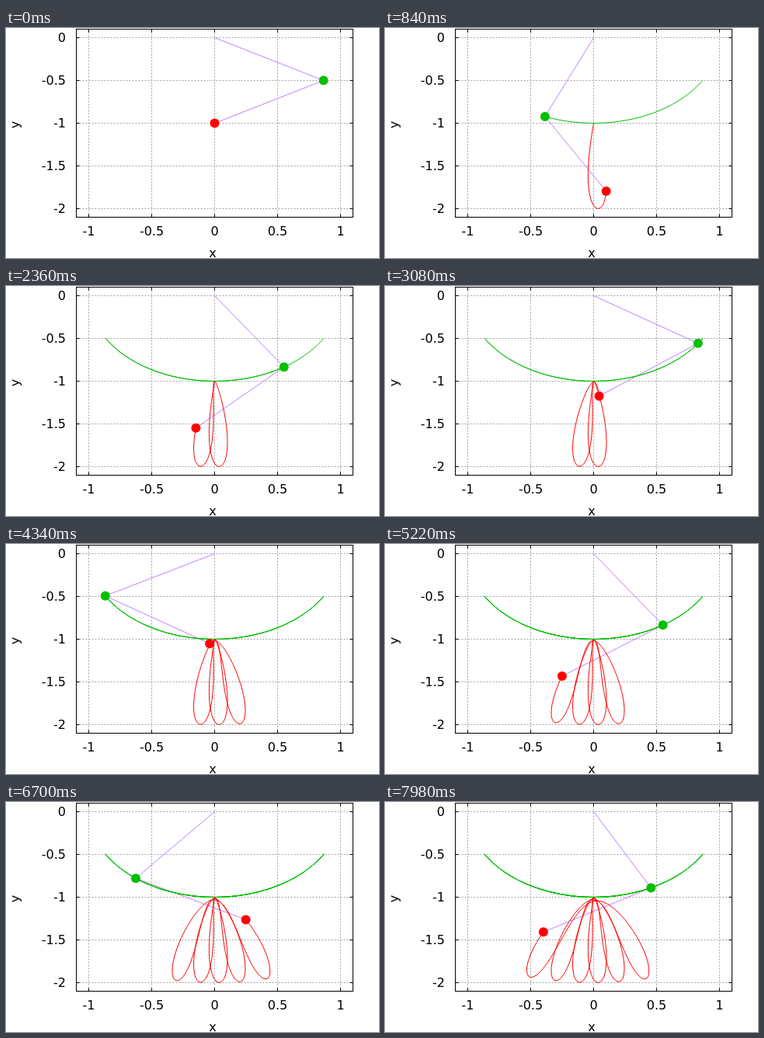
Write an HTML page with a canvas that moves like this. It is 480x296 px and loops after 8 s.

```html
<!DOCTYPE html>
<html lang="en">
<head>
<meta charset="utf-8">
<title>Double pendulum</title>
<style>
  html, body { margin: 0; width: 100%; height: 100%; overflow: hidden; background: #fff; }
  canvas { display: block; }
</style>
</head>
<body>
<canvas id="stage" width="480" height="296"></canvas>
<script>
const ctx = document.getElementById('stage').getContext('2d');

const STEP_MS = 20;
const STEPS = 400;
const DT = 2 * Math.PI / 144;   // time per step, with g = 1 and rod length = 1
const SUBSTEPS = 20;

const BOX = { left: 90.5, right: 446.5, top: 1.5, bottom: 243.5 };
const px = x => 268.5 + x * 161.8;
const py = y => 12.5 - y * 110;

const GREEN = '#00c000';
const RED = '#ff0000';
const PURPLE = '#c080ff';

// Equal masses; state is [angle 1, angle 2, speed 1, speed 2].
function derive([a1, a2, v1, v2]) {
  const c = Math.cos(a1 - a2);
  const s = Math.sin(a1 - a2);
  const pull = v1 * v1 * s - Math.sin(a2);
  const acc1 = (-2 * Math.sin(a1) - v2 * v2 * s - c * pull) / (2 - c * c);
  return [v1, v2, acc1, pull - acc1 * c];
}

function rk4(q, h) {
  const add = (k, f) => q.map((v, i) => v + k[i] * f);
  const k1 = derive(q);
  const k2 = derive(add(k1, h / 2));
  const k3 = derive(add(k2, h / 2));
  const k4 = derive(add(k3, h));
  return q.map((v, i) => v + h / 6 * (k1[i] + 2 * k2[i] + 2 * k3[i] + k4[i]));
}

function simulate() {
  const path = { green: [], red: [] };
  let q = [Math.PI / 3, -Math.PI / 3, 0, 0];
  for (let n = 0; n < STEPS; n++) {
    const x = Math.sin(q[0]);
    const y = -Math.cos(q[0]);
    path.green.push([px(x), py(y)]);
    path.red.push([px(x + Math.sin(q[1])), py(y - Math.cos(q[1]))]);
    for (let i = 0; i < SUBSTEPS; i++) q = rk4(q, DT / SUBSTEPS);
  }
  return path;
}

function polyline(points, color, dash = []) {
  ctx.beginPath();
  for (const [x, y] of points) ctx.lineTo(x, y);
  ctx.setLineDash(dash);
  ctx.strokeStyle = color;
  ctx.stroke();
  ctx.setLineDash([]);
}

function dot([x, y], color) {
  ctx.beginPath();
  ctx.arc(x, y, 6, 0, 2 * Math.PI);
  ctx.fillStyle = color;
  ctx.fill();
}

const crisp = v => Math.floor(v) + 0.5;

function drawAxes() {
  const { left, right, top, bottom } = BOX;
  const grid = '#a0a0a0';
  const tick = 4;
  ctx.lineWidth = 1;
  ctx.font = '16px "DejaVu Sans", sans-serif';
  ctx.fillStyle = '#000';

  ctx.textAlign = 'center';
  for (const v of [-1, -0.5, 0, 0.5, 1]) {
    const x = crisp(px(v));
    polyline([[x, bottom], [x, top]], grid, [2, 2]);
    polyline([[x, bottom], [x, bottom - tick]], '#000');
    polyline([[x, top], [x, top + tick]], '#000');
    ctx.fillText(String(v), x, 267);
  }
  ctx.textAlign = 'right';
  for (const v of [0, -0.5, -1, -1.5, -2]) {
    const y = crisp(py(v));
    polyline([[left, y], [right, y]], grid, [2, 2]);
    polyline([[left, y], [left + tick, y]], '#000');
    polyline([[right, y], [right - tick, y]], '#000');
    ctx.fillText(String(v), 77, y + 5.5);
  }
  ctx.strokeStyle = '#000';
  ctx.strokeRect(left, top, right - left, bottom - top);

  ctx.textAlign = 'center';
  ctx.fillText('x', 266, 295);
  ctx.save();
  ctx.translate(17, 124.5);
  ctx.rotate(-Math.PI / 2);
  ctx.fillText('y', 0, 0);
  ctx.restore();
}

const path = simulate();
const pivot = [px(0), py(0)];

function draw(n) {
  ctx.fillStyle = '#fff';
  ctx.fillRect(0, 0, 480, 296);
  drawAxes();
  polyline([pivot, path.green[n], path.red[n]], PURPLE);
  polyline(path.green.slice(0, n + 1), GREEN);
  polyline(path.red.slice(0, n + 1), RED);
  dot(path.green[n], GREEN);
  dot(path.red[n], RED);
}

const start = performance.now();

function loop() {
  const elapsed = Math.max(0, performance.now() - start);
  draw(Math.floor(elapsed / STEP_MS) % STEPS);
  requestAnimationFrame(loop);
}
loop();
</script>
</body>
</html>
```
